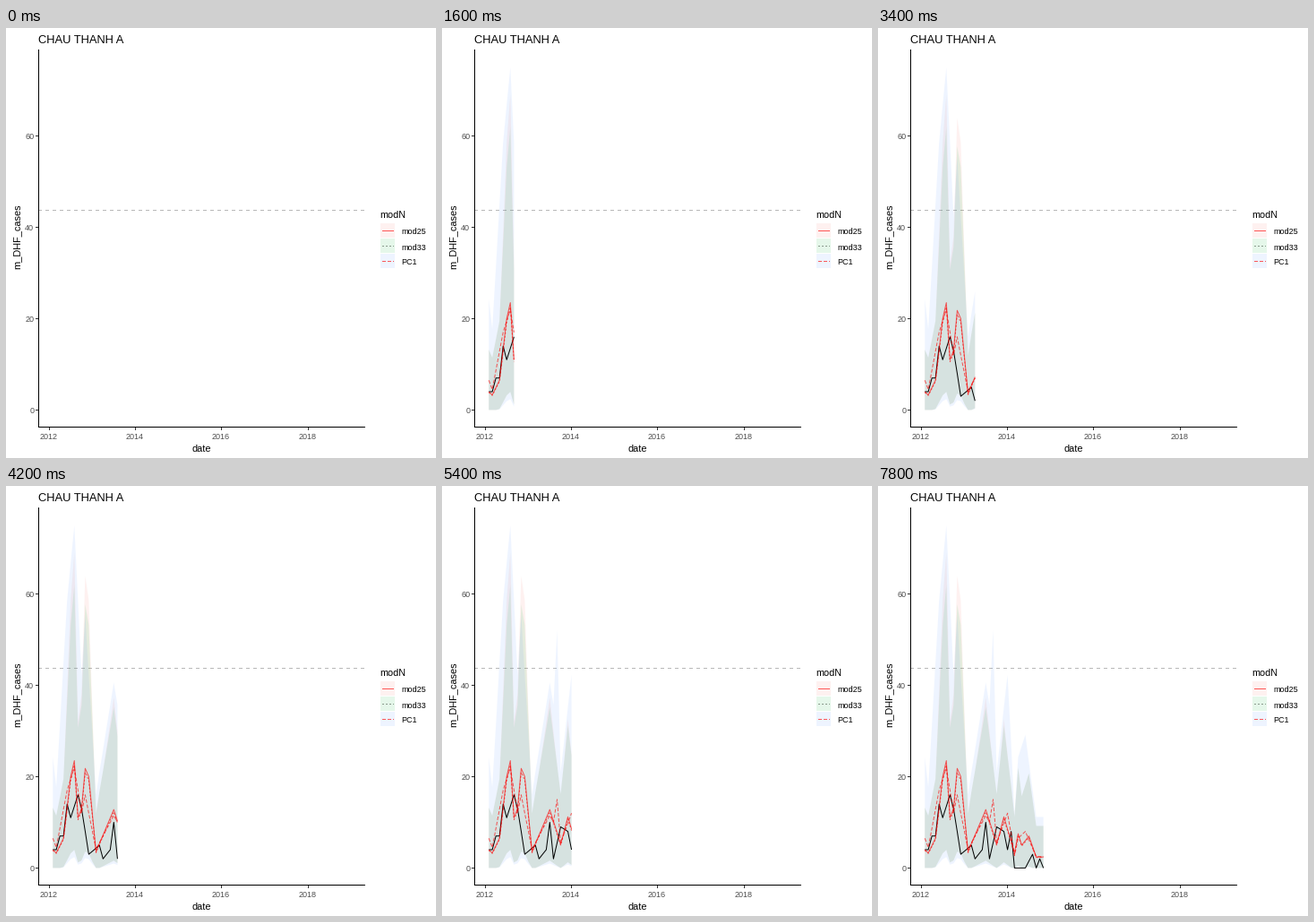
Recreate the animation shown at these times as a matplotlib script. Size 480x480 px, loop 8 s.

```python
import numpy as np
import matplotlib.pyplot as plt
from matplotlib.animation import FuncAnimation
from matplotlib.patches import Polygon, Rectangle

SIZE, FRAMES, STEP = 480, 40, 200
MONTHS = np.arange(34)  # February 2012 to November 2014
RED = (1, 0, 0, 0.64)
HUES = {"mod25": "#F8766D", "mod33": "#00BA38", "PC1": "#619CFF"}
DASHES = {"mod25": "-", "mod33": (0, (2, 2)), "PC1": (0, (4, 2))}

plt.rcParams["font.family"] = "Liberation Sans"
plt.rcParams["lines.scale_dashes"] = False


def track(*turns):
    """Monthly values running straight between (month, value) turns."""
    return np.interp(MONTHS, *zip(*turns))


def spread(mean, base, gain):
    """Low and high edge of the band around a mean."""
    return np.maximum(0, 0.22 * mean - 1.2), base + gain * mean


cases = track((1, 4), (2, 7), (3, 7), (4, 14), (5, 11), (7, 16), (8, 13),
              (10, 3), (13, 5), (14, 2), (16, 4), (17, 10), (18, 2), (20, 9),
              (22, 8), (23, 4), (24, 8), (25, 0), (28, 0), (30, 3), (31, 0),
              (32, 2), (33, 0))
mod25 = track((0, 4), (1, 3.3), (3, 6.5), (5, 20), (6, 23.5), (7, 11), (8, 13),
              (9, 21.8), (10, 20), (12, 3.5), (17, 12.8), (20, 5.2),
              (22, 11.2), (25, 3.2), (26, 7.5), (27, 5), (29, 7), (31, 2.4))
pc1 = track((0, 6.5), (1, 4.5), (4, 17), (6, 22), (8, 12), (9, 16), (12, 4),
            (17, 11.5), (18, 10), (19, 15), (20, 5.5), (23, 12), (25, 2.7),
            (26, 6.5), (28, 8), (31, 2.5))

means = {"mod25": mod25, "mod33": mod25 * 0.96, "PC1": pc1}
low, high = spread(mod25, 3.2, 2.5)
bands = {"mod25": (low, high + 0.45 * np.maximum(0, mod25 - 8)),
         "mod33": (low, high),
         "PC1": (low * 0.6, spread(pc1, 3, 3.27)[1])}


def day(month):
    """Days from January 2012 to the first of the given month."""
    start = np.datetime64("2012-01")
    first = (start + month).astype("datetime64[D]")
    return (first - start.astype("datetime64[D]")).astype(int)


def to_x(days):
    return 48.2 + np.asarray(days) * 0.13185


def to_y(value):
    return 426.4 - np.asarray(value) * 5.1


days = np.array([day(int(m) + 1) for m in MONTHS])
# Each month lands on a whole frame; 99 steps cover the full seven years
arrival = np.round((days - days[0]) * 99 / (day(84) - days[0]))

fig = plt.figure(figsize=(SIZE / 72, SIZE / 72), dpi=72, facecolor="white")
ax = fig.add_axes([0, 0, 1, 1])
ax.set(xlim=(0, SIZE), ylim=(SIZE, 0))
ax.axis("off")


def line(xs, ys, color, style="-", z=1):
    return ax.plot(xs, ys, color=color, ls=style, lw=1, zorder=z, snap=False,
                   solid_capstyle="butt", dash_capstyle="butt")[0]


def label(x, y, text, size, color="black", **kw):
    kw.setdefault("va", "baseline")
    ax.text(x, y, text, fontsize=size, color=color, **kw)


def draw_axes():
    line([36, 401], [203.5, 203.5], "#b8b8b8", (0, (4, 4)))
    line([36.5, 36.5], [24, 446], "black", z=5)
    line([36, 401], [445.5, 445.5], "black", z=5)
    for year in range(2012, 2020, 2):
        x = np.floor(to_x(day((year - 2012) * 12))) + 0.5
        line([x, x], [446, 449], "#333333")
        label(x - 0.5, 459, str(year), 9, "#4D4D4D", ha="center")
    for value in range(0, 80, 20):
        y = np.floor(to_y(value)) + 0.5
        line([33, 36], [y, y], "#333333")
        label(31.3, y + 4, str(value), 9, "#4D4D4D", ha="right")
    label(36, 17, "CHAU THANH A", 12.9)
    label(218.5, 473, "date", 11, ha="center")
    label(12, 233, "m_DHF_cases", 11, ha="center", va="center", rotation=90)


def draw_legend():
    label(417.5, 212, "modN", 10.7)
    for i, (name, hue) in enumerate(HUES.items()):
        top = 218 + 17 * i
        ax.add_patch(Rectangle((418, top), 16, 16, fc=hue, alpha=0.1, lw=0))
        color = "#8a9a8c" if name == "mod33" else RED
        line([420, 433], [top + 8.5] * 2, color, DASHES[name])
        label(441, top + 12.5, name, 9)


draw_axes()
draw_legend()
ribbons = {name: ax.add_patch(Polygon(np.zeros((3, 2)), fc=hue, alpha=0.1,
                                      lw=0, zorder=2))
           for name, hue in HUES.items()}
curves = {name: line([], [], RED, DASHES[name], z=4) for name in HUES}
case_line = line([], [], "black", z=3)
artists = [*ribbons.values(), *curves.values(), case_line]


def update(frame):
    tip = np.interp(frame, arrival, MONTHS)
    at = np.append(MONTHS[MONTHS < tip], tip)
    xs = to_x(np.interp(at, MONTHS, days))

    def ys(series):
        return to_y(np.interp(at, MONTHS, series))

    for name, (bottom, top) in bands.items():
        upper = np.column_stack([xs, ys(top)])
        lower = np.column_stack([xs, ys(bottom)])
        ribbons[name].set_xy(np.vstack([upper, lower[::-1]]))
        curves[name].set_data(xs, ys(means[name]))
    case_line.set_data(xs, ys(cases))
    for artist in artists:
        artist.set_visible(frame > 0)
    return artists


anim = FuncAnimation(fig, update, frames=FRAMES, interval=STEP,
                     init_func=lambda: update(0), repeat=True, repeat_delay=0)
plt.show()
```
